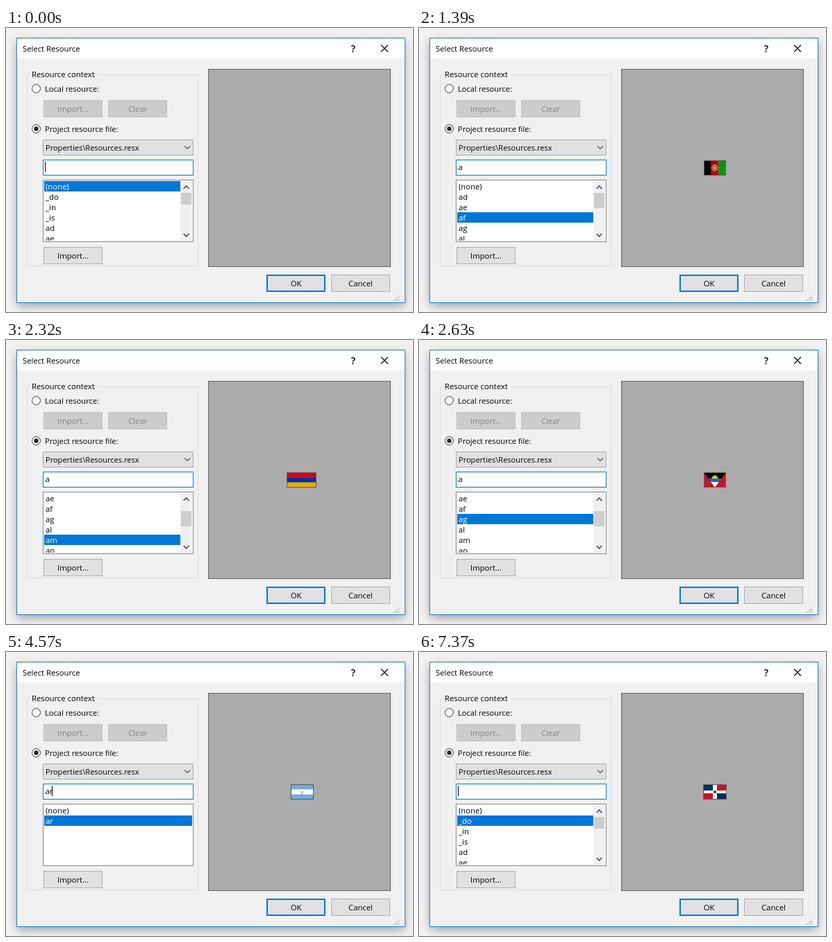
An HTML page that plays this animation: 586 by 410 pixels, repeating every 7840 ms.

```html
<!DOCTYPE html>
<html lang="en">
<head>
<meta charset="utf-8">
<title>Select Resource</title>
<style>
  html, body { margin: 0; width: 100%; height: 100%; overflow: hidden; background: #f2f2f2; }
  svg { display: block; width: 586px; height: 410px; }
  text { font: 11.3px "Open Sans", "Noto Sans", sans-serif; fill: #000; white-space: pre; }
  .mid { text-anchor: middle; }
  .off { fill: #838383; }
</style>
</head>
<body>
<svg id="stage" viewBox="0 0 586 410" xmlns="http://www.w3.org/2000/svg"></svg>
<script>
const LOOP = 7840, ROW = 15, TOP = 221, BLUE = '#0078d7';
const CODES = ['_do', '_in', '_is', 'ad', 'ae', 'af', 'ag', 'al', 'am', 'ao', 'ar', 'at'];

// Each step overrides part of the state from its time on.
const STEPS = [
  [0, { caret: 1, query: '', pick: '(none)', scroll: 0 }],
  [70, { caret: 0 }],
  [530, { caret: 1 }],
  [770, { query: 'a', pick: 'ad' }],
  [1140, { pick: 'ae' }],
  [1310, { caret: 0 }],
  [1390, { pick: 'af' }],
  [1690, { pick: 'ag' }],
  [1840, { caret: 1 }],
  [1920, { scroll: 5 }],
  [2000, { pick: 'al', scroll: 15 }],
  [2080, { scroll: 20 }],
  [2150, { pick: 'am', scroll: 30 }],
  [2320, { caret: 0 }],
  [2380, { pick: 'al' }],
  [2630, { pick: 'ag' }],
  [2780, { pick: 'af' }],
  [2860, { caret: 1 }],
  [3010, { pick: 'ae' }],
  [3250, { pick: 'ad', scroll: 15 }],
  [3390, { caret: 0 }],
  [3940, { caret: 1 }],
  [4410, { caret: 0 }],
  [4570, { caret: 1, query: 'ar', pick: 'ar', scroll: 0 }],
  [5030, { caret: 0 }],
  [5580, { caret: 1 }],
  [6050, { query: 'a', pick: 'ad' }],
  [6280, { query: '', pick: '_do' }],
  [6830, { caret: 0 }],
  [7370, { caret: 1 }]
];

const rect = (x, y, w, h, fill) => `<rect x="${x}" y="${y}" width="${w}" height="${h}" fill="${fill}"/>`;
const frame = (x, y, w, h, fill, edge, line = 1) =>
  `<rect x="${x + line / 2}" y="${y + line / 2}" width="${w - line}" height="${h - line}" fill="${fill}" stroke="${edge}" stroke-width="${line}"/>`;
const path = (d, fill, more = '') => `<path d="${d}" fill="${fill}" ${more}/>`;
const dot = (x, y, r, fill, more = '') => `<circle cx="${x}" cy="${y}" r="${r}" fill="${fill}" ${more}/>`;
const label = (x, y, s, more = '') => `<text x="${x}" y="${y}" ${more}>${s}</text>`;
const chevron = (x, y, w, h, line) =>
  path(`M${x - w} ${y - h / 2}L${x} ${y + h / 2}L${x + w} ${y - h / 2}`, 'none', `stroke="#505050" stroke-width="${line}"`);

function button(x, y, s, kind) {
  const [fill, edge, line] = kind === 'off' ? ['#ccc', '#bfbfbf', 1]
    : kind === 'main' ? ['#e1e1e1', BLUE, 2] : ['#e1e1e1', '#adadad', 1];
  return frame(x, y, 85, 25, fill, edge, line) +
    label(x + 42.5, y + 17, s, `class="mid ${kind === 'off' ? 'off' : ''}"`);
}

function grip() {
  let out = '';
  for (let r = 0; r < 3; r++)
    for (let c = 2 - r; c < 3; c++) out += rect(558 + c * 3, 386 + r * 3, 2, 2, '#bfbfbf');
  return out;
}

const backdrop = `
  <defs>
    <filter id="soft" x="-10%" y="-10%" width="120%" height="125%"><feGaussianBlur stdDeviation="7"/></filter>
    <clipPath id="view"><rect x="55" y="${TOP}" width="213" height="86"/></clipPath>
  </defs>
  ${rect(0, 0, 586, 410, '#f2f2f2')}
  <rect x="16" y="19" width="558" height="382" opacity=".36" filter="url(#soft)"/>
  ${frame(15, 14, 560, 383, '#f0f0f0', '#2181cd')}
  ${rect(16, 15, 558, 29, '#fff')}
  ${label(24, 34, 'Select Resource')}
  ${label(500, 34.5, '?', 'class="mid" style="font-size:14px;font-weight:600"')}
  ${path('M540 24.5L550 34.5M550 24.5L540 34.5', 'none', 'stroke="#000" stroke-width="1.1"')}
  ${frame(30, 67, 247, 277, 'none', '#dcdcdc')}
  ${rect(35, 66, 97, 3, '#f0f0f0')}
  ${label(37, 71, 'Resource context')}
  ${dot(43.5, 87.5, 6, '#fff', 'stroke="#333"')}
  ${label(56, 92, 'Local resource:', 'style="font-size:11.15px"')}
  ${button(54, 104, 'Import...', 'off')}${button(147, 104, 'Clear', 'off')}
  ${dot(43.5, 145.5, 6, '#fff', 'stroke="#333"')}${dot(43.5, 145.5, 3.2, '#222')}
  ${label(56, 150, 'Project resource file:', 'style="font-size:11.1px"')}
  ${frame(53, 161, 217, 23, '#e1e1e1', '#adadad')}
  ${label(57, 177, 'Properties\\Resources.resx', 'style="font-size:11.05px"')}
  ${chevron(261, 172.5, 4, 4, 1.1)}
  ${frame(53, 190, 217, 23, '#fff', BLUE)}
  ${frame(53, 219, 217, 90, '#fff', '#828790')}
  ${button(54, 316, 'Import...')}
  ${frame(291, 59, 263, 286, '#ababab', '#646464')}
  ${button(375, 356, 'OK', 'main')}${button(468, 356, 'Cancel')}
  ${grip()}
  <g id="live"></g>`;

// Stripes share the flag's box evenly, across or down.
const bars = (x, w, colours) => colours.map((c, i) => rect(x + i * w / colours.length, 191, w / colours.length, 22, c)).join('');
const bands = (x, w, colours) => colours.map((c, i) => rect(x, 191 + i * 22 / colours.length, w, 22 / colours.length, c)).join('');

function sun() {
  let d = '';
  for (let i = 0; i <= 16; i++) {
    const a = Math.PI * (1 + i / 16), r = i % 2 ? 3.4 : 6;
    d += `${i ? 'L' : 'M'}${426 + r * Math.cos(a)} ${200 + r * Math.sin(a)}`;
  }
  return path(d + 'Z', '#fcd116');
}

const FLAGS = {
  ad: [411, 31, () => bars(411, 31, ['#36099a', '#fedf00', '#d8203f']) +
    dot(426.5, 202, 4.4, '#c98a3c') + path('M423.5 202h6M426.5 198.5v7', 'none', 'stroke="#b5582c"')],
  ae: [404, 43, () => bands(404, 43, ['#00843d', '#fff', '#000']) + rect(404, 191, 11, 22, '#e00020')],
  af: [410, 32, () => bars(410, 32, ['#000', '#be0000', '#009900']) +
    dot(426, 202, 4, 'none', 'stroke="#e8a08a" stroke-width="1.3"') + rect(424, 200, 4, 4, '#e0a48c')],
  ag: [410, 32, () => rect(410, 191, 32, 22, '#ce1126') + path('M410 191H442L426 213Z', '#000') + sun() +
    path('M416.5 200H435.5L431.8 205H420.2Z', '#0072c6') + path('M420.2 205H431.8L426 213Z', '#fff')],
  al: [411, 31, () => rect(411, 191, 31, 22, '#e41e20') +
    path('M426.5 197L424 194.5L422.5 196L424.5 198L419 196L420 203L424 204L423 207L426.5 210L430 207L429 204L433 203L434 196L428.5 198L430.5 196L429 194.5Z', '#000')],
  am: [404, 43, () => bands(404, 43, ['#d90012', '#0033a0', '#f2a800'])],
  ar: [410, 33, () => bands(410, 33, ['#74acdf', '#fff', '#74acdf']) + dot(426.5, 202, 1.6, '#f0b040') + rect(426, 203, 1, 2, '#b97a35')],
  _do: [409, 34, () => rect(409, 191, 34, 22, '#fff') +
    rect(409, 191, 14, 9, '#002d62') + rect(429, 191, 14, 9, '#ce1126') +
    rect(409, 204, 14, 9, '#ce1126') + rect(429, 204, 14, 9, '#002d62') +
    rect(424, 200, 4, 4, '#3f6e4c') + rect(425, 201, 2, 2, '#333')]
};

function flag(code) {
  if (!FLAGS[code]) return '';
  const [x, w, draw] = FLAGS[code];
  return draw() + frame(x, 191, w, 22, 'none', '#5c5c5c');
}

function list({ query, pick, scroll }) {
  const items = ['(none)', ...CODES.filter(c => c.startsWith(query))];
  const long = items.length > 5;
  let out = '';
  items.forEach((s, i) => {
    const y = TOP + i * ROW - scroll, on = s === pick;
    if (y > 307 || y + ROW < TOP) return;
    if (on) out += rect(55, y, long ? 196 : 213, ROW, BLUE);
    out += label(57, y + 12, s, on ? 'style="fill:#fff"' : '');
  });
  if (long) {
    const first = Math.ceil(scroll / ROW);
    out += rect(251, TOP, 17, 86, '#f0f0f0') +
      rect(252, 238 + Math.floor(first * 4.5), 15, query ? 22 : 17, '#cdcdcd') +
      chevron(259.5, 230, 3.8, -4, 1.7) + chevron(259.5, 299, 3.8, 4, 1.7);
  }
  return `<g clip-path="url(#view)">${out}</g>`;
}

const stage = document.getElementById('stage');
stage.innerHTML = backdrop;
const live = document.getElementById('live');

let shown = -1;
function draw(time) {
  const t = time % LOOP;
  const past = STEPS.filter(([at]) => at <= t);
  if (past.length === shown) return;
  shown = past.length;
  const state = Object.assign({}, ...past.map(p => p[1]));
  const caretX = [56, 62, 66][state.query.length];
  live.innerHTML = label(56.5, 205, state.query) +
    (state.caret ? rect(caretX, 193, 1, 15, '#000') : '') +
    list(state) + flag(state.pick);
}

let start = null;
function tick(now) {
  if (start === null) start = now;
  draw(now - start);
  requestAnimationFrame(tick);
}
draw(0);
requestAnimationFrame(tick);
</script>
</body>
</html>
```
